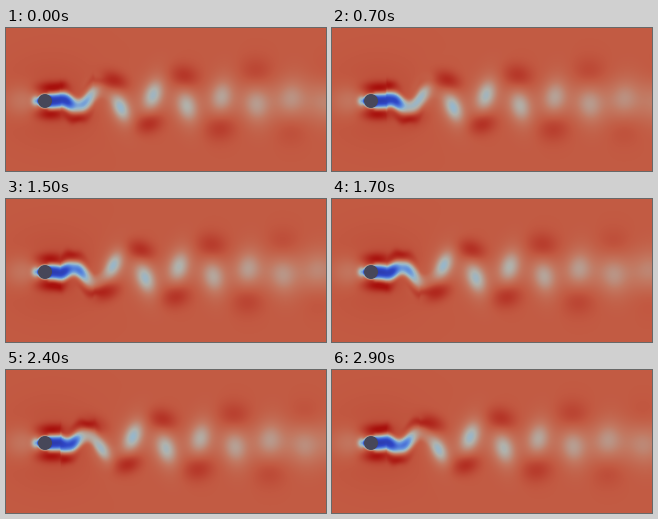
A matplotlib script that plays this animation: 320x143 px, repeating every 3000 ms.

```python
import numpy as np
import matplotlib.pyplot as plt
from matplotlib.animation import FuncAnimation
from matplotlib.colors import LinearSegmentedColormap, Normalize
from matplotlib.patches import Circle

W, H, DPI = 320, 143, 100
FRAMES, INTERVAL = 30, 100
HOLD = 4             # extra frames spent on the first state
HALF_PERIOD = 14.4   # steps between two shed vortices
CX, CY, R = 39, 73, 7

# Speed relative to the free stream -> colour
TOP = 1.3
STOPS = [
    (0.00, (42, 52, 160)), (0.16, (48, 72, 200)), (0.34, (92, 138, 222)),
    (0.48, (148, 184, 208)), (0.60, (178, 177, 170)), (0.84, (194, 121, 98)),
    (1.00, (195, 91, 67)), (1.30, (168, 16, 12)),
]
CMAP = LinearSegmentedColormap.from_list(
    "speed", [(v / TOP, tuple(c / 255 for c in rgb)) for v, rgb in STOPS], N=512)

x, y = np.meshgrid(np.arange(W) + 0.5, np.arange(H) + 0.5)


def sigmoid(t):
    return 1 / (1 + np.exp(-t))


def ramp(t, start, end):
    return np.clip((t - start) / (end - start), 0, 1)


def position(age):
    """Downstream place of a vortex; it speeds up towards the free stream."""
    return 75 + 35 * age + 10 * np.exp(-age / 1.25)


def blob(px, py, sx, sy, tilt=0.0):
    """Elliptic Gaussian, tilted by an angle in radians."""
    c, s = np.cos(tilt), np.sin(tilt)
    a = (x - px) * c + (y - py) * s
    b = (y - py) * c - (x - px) * s
    return np.exp(-0.5 * ((a / sx) ** 2 + (b / sy) ** 2))


def steady_field():
    rim = np.exp(-((np.hypot(x - CX, y - CY) - R) / 1.1) ** 2)
    fast = 0.05 * blob(46, CY, 32, 28)
    for side in (-1, 1):
        fast = fast + 0.25 * blob(44, CY + side * 13, 10, 4.5)
    slow = 0.17 * blob(18, CY, 14, 11) + 0.5 * blob(30, CY, 3, 3.5) + 0.35 * rim
    far = sigmoid((x - 245) / 18) * np.exp(-0.5 * ((y - CY) / 17) ** 2)
    near = sigmoid((x - 105) / 8) * np.exp(-0.5 * ((y - CY) / 13) ** 2)
    return fast, slow + 0.1 * far + 0.06 * near


FAST, SLOW = steady_field()
ages = np.linspace(-1.8, 9, 400)
AGE_AT_X = np.interp(x, position(ages), ages)
SWING = 9 * ramp(x, 46, 88) ** 1.4
HALF_WIDTH = 8.4 - 2.2 * ramp(x, 58, 90)
STRENGTH = sigmoid((82 - x) / 8) * sigmoid(x - 42)
PULSE = 0.3 * sigmoid((x - 66) / 4)


def wake(shift):
    """Slow tail waving behind the cylinder, and the fast flow round its bends."""
    w = np.pi * (AGE_AT_X - shift + 0.12)
    mid = CY - SWING * np.sin(w)
    q = (y - mid) / np.hypot(1, np.gradient(mid, axis=1)) / HALF_WIDTH
    level = STRENGTH * (1 - PULSE * np.sin(w) ** 2)
    tail = level * (0.75 * np.exp(-q ** 4) + 0.2 * np.exp(-(q / 0.5) ** 2))
    outside = (1 - np.sign(q) * np.sin(w)) / 2
    edge = np.exp(-((np.abs(q) - 1.8) / 0.55) ** 2)
    return tail, 0.2 * sigmoid((92 - x) / 5) * sigmoid((x - 52) / 4) * outside * edge


def field(step):
    shift = step / HALF_PERIOD
    tail, bend = wake(shift)
    fast, slow = FAST + bend, SLOW.copy()
    for k in range(-2, 9):
        if k + shift < -1:
            continue
        px = position(k + shift)
        up = -1 if k % 2 == 0 else 1
        grow = ramp(px, 85, 250)
        fade = 1 - ramp(px, 100, 345)
        lean = up * np.radians(27 - 22 * grow)

        # slow vortex core with its pale halo
        slow += 0.43 * fade * sigmoid((px - 84) / 6) * blob(
            px, CY + up * (7 - 3.5 * grow), 5.2 + 3 * grow, 10 + grow, -lean)
        slow += 0.1 * fade * sigmoid((px - 105) / 8) * blob(
            px + 2, CY + up * 14, 10, 17, -lean)

        # fast patch on the opposite side
        fast += 0.24 * fade * sigmoid((px - 96) / 6) * blob(
            px - 7 * (1 - grow), CY - up * (18 + 11 * grow),
            9.5 + 2.5 * grow, 5.5 + 5 * grow, lean)
    return 1 + (fast - slow) * (1 - tail) - tail


fig = plt.figure(figsize=(W / DPI, H / DPI), dpi=DPI)
ax = fig.add_axes([0, 0, 1, 1])
ax.axis("off")
image = ax.imshow(field(0), cmap=CMAP, norm=Normalize(0, TOP),
                  extent=(0, W, H, 0), interpolation="nearest", aspect="auto")
ax.add_patch(Circle((CX, CY), R, fc=(0.28, 0.28, 0.35), ec="none"))
ax.set_xlim(0, W)
ax.set_ylim(H, 0)


def update(i):
    image.set_data(field(max(0, i - HOLD)))
    return (image,)


anim = FuncAnimation(fig, update, frames=FRAMES, interval=INTERVAL,
                     repeat=True, repeat_delay=0)
plt.show()
```
